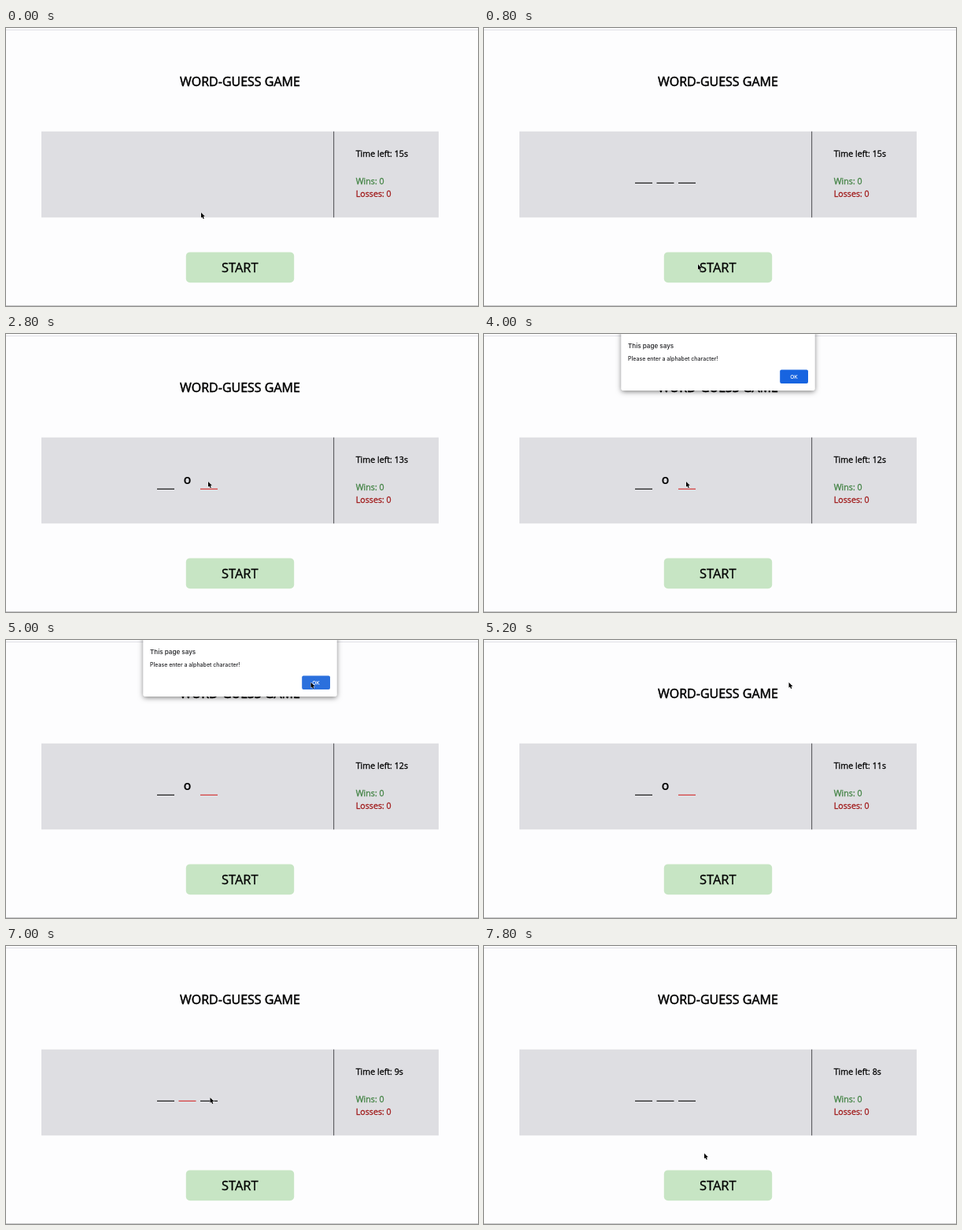
Write an HTML page that moves like this. It is 600 px wide and 354 px high and loops after 8000 ms.

```html
<!DOCTYPE html>
<html lang="en">
<head>
<meta charset="utf-8">
<title>Word-guess game</title>
<style>
  html, body { margin: 0; width: 100%; height: 100%; overflow: hidden; background: #fdfdfe; }
  svg { display: block; width: 600px; height: 354px; }
  text { font-family: "Open Sans", "Noto Sans", sans-serif; fill: currentColor; stroke: currentColor; stroke-width: .3px; }
  .info { font-size: 10.7px; }
  .title { font-size: 16px; stroke-width: .5px; }
  .start { font-size: 16.5px; }
  .letter { font-size: 12px; font-weight: 700; stroke-width: 0; }
  .wins { color: #3f8040; }
  .losses { color: #a01818; }
  .dialog { color: #202124; }
  .dialog text { font-family: Inter, Roboto, sans-serif; font-weight: 500; stroke-width: 0; }
  .slot { stroke-width: 1.2px; }
</style>
</head>
<body>
<svg viewBox="0 0 600 354">
  <defs>
    <filter id="shadow" x="-10%" y="-20%" width="120%" height="150%">
      <feDropShadow dx="0" dy="1.5" stdDeviation="3" flood-opacity=".5"/>
    </filter>
  </defs>
  <rect width="600" height="354" fill="#fdfdfe"/>
  <rect y="2" width="600" height="1" fill="#dfdfe6"/>
  <rect y="353" width="600" height="1" fill="#c9c9cc"/>
  <text class="title" x="297.5" y="73.7" text-anchor="middle">WORD-GUESS GAME</text>

  <rect x="45" y="131.7" width="505" height="109.6" fill="#dedee2"/>
  <rect x="416" y="131.7" width="1.2" height="109.6" fill="#626266"/>
  <text class="info" id="time" x="444.7" y="164"></text>
  <text class="info wins" x="444.7" y="199">Wins: 0</text>
  <text class="info losses" x="444.7" y="215">Losses: 0</text>

  <g id="slots"></g>
  <text class="letter" id="letter" x="230.5" y="191" text-anchor="middle">O</text>

  <rect x="228.8" y="285.4" width="137.4" height="38.8" rx="5" fill="#c7e5c4"/>
  <text class="start" x="297.3" y="311" text-anchor="middle">START</text>

  <g class="dialog" id="dialog">
    <rect x="174.5" y="-6" width="246" height="78" rx="3" fill="#fff" filter="url(#shadow)"/>
    <text x="183" y="18" font-size="8.1">This page says</text>
    <text x="183" y="34" font-size="7">Please enter a alphabet character!</text>
    <rect id="ok" x="376.2" y="45.4" width="35.8" height="17.6" rx="2"/>
    <text x="394" y="56.7" font-size="6.6" color="#fff" text-anchor="middle">OK</text>
  </g>

  <path id="cursor" d="M0 0V6.8L1.5 5.4L2.6 8L3.9 7.4L2.8 5H4.9Z" stroke="#fff" stroke-width=".8" paint-order="stroke"/>
</svg>
<script>
const LOOP = 8000, STEP = 200;
const $ = id => document.getElementById(id);

const slots = [0, 1, 2].map(i => {
  const slot = document.createElementNS('http://www.w3.org/2000/svg', 'path');
  slot.setAttribute('class', 'slot');
  slot.setAttribute('d', `M${192 + 27.5 * i} 197.4h22`);
  return $('slots').appendChild(slot);
});

// The pointer eases to each stop between its two times.
const stops = [
  { from: 0, to: 600, x: 272, y: 301 },
  { from: 800, to: 1200, x: 226.5, y: 186 },
  { from: 2000, to: 2600, x: 257, y: 188 },
  { from: 4000, to: 5000, x: 387.5, y: 54 },
  { from: 5200, to: 5800, x: 259.5, y: 193 },
  { from: 7200, to: 7600, x: 250, y: 224 },
  { from: 7600, to: 7800, x: 280, y: 264 }
];

const within = (t, from, to) => t >= from && t < to;
const show = (el, on) => el.style.visibility = on ? 'visible' : 'hidden';

function pointerAt(t) {
  let x = 248, y = 235;
  for (const stop of stops) {
    const p = Math.min(1, Math.max(0, (t - stop.from) / (stop.to - stop.from)));
    const eased = p * p * (3 - 2 * p);
    x += (stop.x - x) * eased;
    y += (stop.y - y) * eased;
  }
  return `translate(${x} ${y})`;
}

function focusedSlot(t) {
  if (!within(t, 1200, 7400)) return -1;
  if (t < 2000) return 1;
  // Backspace steps left from the last slot.
  return t < 7000 ? 2 : t < 7200 ? 1 : 0;
}

function render(now) {
  const t = Math.floor((now % LOOP) / STEP) * STEP;
  const guessed = within(t, 2000, 7000);
  const alerting = within(t, 4000, 5200);
  const focused = focusedSlot(t);

  // The countdown is held while the alert is open.
  const clock = alerting ? 4000 : t;
  $('time').textContent = `Time left: ${15 - Math.max(0, Math.floor((clock - 600) / 1000))}s`;
  slots.forEach((slot, i) => {
    show(slot, t >= 800 && !(guessed && i === 1));
    slot.style.stroke = i === focused ? '#d33a3a' : '#1a1a1a';
  });
  show($('letter'), guessed);
  show($('dialog'), alerting);
  $('ok').style.fill = t >= 4800 ? '#2b70dd' : '#1764e0';
  $('cursor').setAttribute('transform', pointerAt(t));
}

function tick(now) {
  render(now);
  requestAnimationFrame(tick);
}
render(0);
requestAnimationFrame(tick);
</script>
</body>
</html>
```
